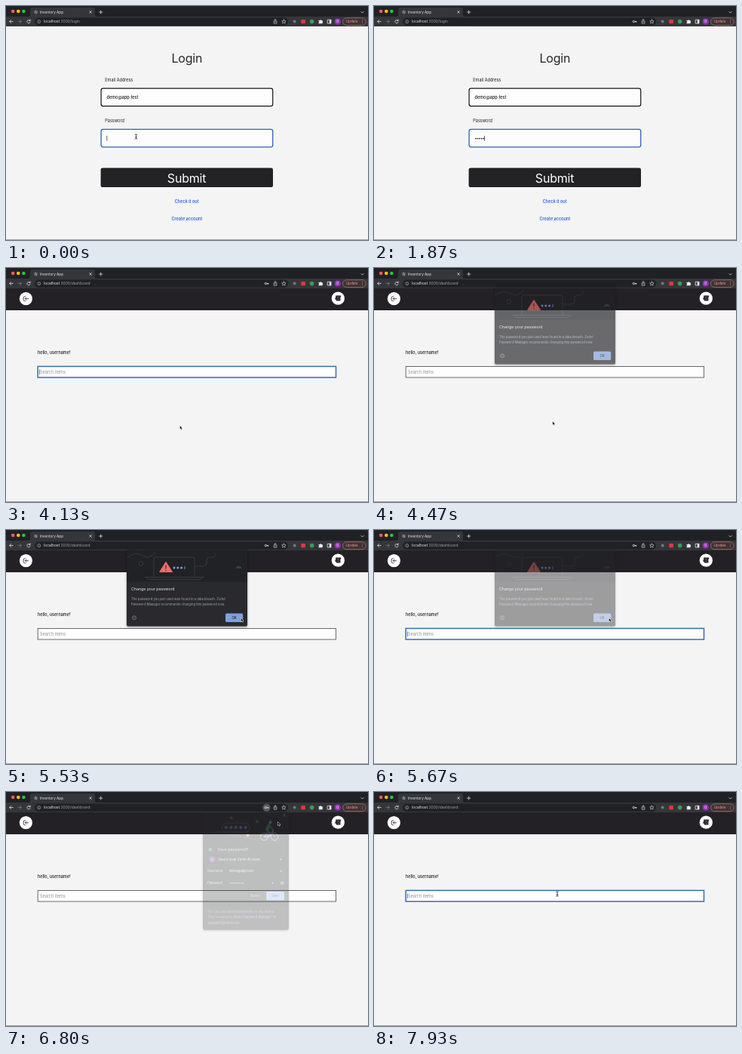
An HTML page for the animation above (8 s loop, 480x310 px).

```html
<!DOCTYPE html>
<html lang="en">
<head>
<meta charset="utf-8">
<title>Inventory App</title>
<style>
  html, body { margin: 0; width: 100%; height: 100%; overflow: hidden; background: #f4f4f4; }
  svg { display: block; width: 100vw; height: 100vh; font-family: Inter, "Open Sans", sans-serif; }
  .page { font-size: 5.5px; fill: #1c1b1f; }
  .ui { font-size: 4.95px; fill: #e8eaed; }
  .small { font-size: 4.22px; fill: #e8eaed; }
  .title { font-size: 5.25px; fill: #e8eaed; }
  .dim { fill: #9aa0a6; }
  .blue { fill: #8ab4f8; }
  .link { fill: #2f66e3; font-weight: 600; }
  .big { font-size: 16px; letter-spacing: -.2px; }
  .mid { text-anchor: middle; }
  .med { font-weight: 500; }
  .line { fill: none; stroke-linecap: round; stroke-linejoin: round; }
  .dots { fill: none; stroke-linecap: round; }
</style>
</head>
<body>
<svg viewBox="0 0 480 310">
  <defs>
    <filter id="shadow" x="-10%" y="-10%" width="120%" height="125%">
      <feDropShadow dx="0" dy="1.2" stdDeviation="1.6" flood-color="#000" flood-opacity=".45"/>
    </filter>
  </defs>
  <rect width="480" height="310" fill="#f4f4f4"/>

  <g id="login" class="page">
    <text class="big mid" x="239.8" y="75" fill="#27262c">Login</text>
    <text x="131.3" y="99.6">Email Address</text>
    <rect x="126.1" y="109.2" width="227.6" height="23.4" rx="2.6" fill="#fdfdfd" stroke="#161519" stroke-width="1.2"/>
    <text class="med" x="133.6" y="123">demo@app.test</text>
    <text x="131.3" y="153.7">Password</text>
    <rect id="pass" x="126.1" y="163.3" width="227.6" height="23.6" rx="2.6" fill="#fdfdfd" stroke-width="1.3"/>
    <path id="typed" class="dots" stroke="#161519" stroke-width="1.7"/>
    <rect id="passCaret" y="171.9" width=".7" height="6.9" fill="#222"/>
    <rect x="125.6" y="214.4" width="228.4" height="25.7" rx="2.6" fill="#232225"/>
    <text class="big mid" x="239.6" y="233.6" fill="#fff">Submit</text>
    <text class="link mid" x="239.7" y="260.7">Check it out</text>
    <text class="link mid" x="239.8" y="283.6">Create account</text>
  </g>

  <g id="dash" class="page">
    <rect y="27" width="480" height="29" fill="#232126"/>
    <circle cx="26.4" cy="40.6" r="8.6" fill="#fff"/>
    <path class="line" d="M25.6 37.8H24.4Q23.2 37.8 23.2 39V42.4Q23.2 43.6 24.4 43.6H25.6M29.6 40.7H25.4M27 39L25.3 40.7L27 42.4" stroke="#232126" stroke-width=".8"/>
    <circle cx="440.3" cy="40.2" r="8.6" fill="#fff"/>
    <path d="M437.2 36.4H444.2V38.6H443.4V43.6H437.8V41.8H436.4V39.4H437.2Z" fill="#232126"/>
    <path d="M438.8 38.6H442M439 41.2H442.2" stroke="#aaa" stroke-width=".5"/>
    <text class="med" x="42" y="113.7">hello, username!</text>
    <rect id="search" x="42.2" y="130.4" width="395.3" height="14.6" fill="#fefefe"/>
    <text x="45" y="139.8" fill="#8b8d94">Search items</text>
    <rect id="searchCaret" x="44.1" y="134.4" width=".6" height="6.8" fill="#333"/>
  </g>

  <rect y="309" width="480" height="1" fill="#a2a2a3"/>

  <g id="chrome">
    <rect width="480" height="27" fill="#202124"/>
    <path d="M0 14H30Q32 14 32 12V5Q32 2 35 2H115Q118 2 118 5V12Q118 14 120 14H480V27H0Z" fill="#35363a"/>
    <circle cx="9.2" cy="7" r="2.3" fill="#fe5f57"/>
    <circle cx="16.3" cy="7" r="2.3" fill="#febc2e"/>
    <circle cx="23.4" cy="7" r="2.3" fill="#28c840"/>
    <circle cx="39.6" cy="8.1" r="2.3" fill="#8d9196"/>
    <path class="line" d="M38 7.2L39.4 8.4L39 9.8M40.2 6.2L41.2 8.2" stroke="#35363a" stroke-width=".7"/>
    <text class="ui" x="45" y="9.9" style="font-size:4.7px">Inventory App</text>
    <g class="line" stroke="#dadce0" stroke-width=".8">
      <path d="M110.8 6.7L113.4 9.3M113.4 6.7L110.8 9.3M123.6 8.1H127.8M125.7 6V10.2M471 7.6L472.6 9.2L474.2 7.6"/>
      <path d="M9.2 20.5H4.8M6.8 18.4L4.7 20.5L6.8 22.6"/>
      <path d="M16 20.5H20.4M18.4 18.4L20.5 20.5L18.4 22.6" stroke="#77797d"/>
      <path d="M31.8 19.2A2.2 2.2 0 1 0 32.2 21.2M32.2 17.9V19.6H30.5"/>
    </g>
    <rect x="38" y="15.4" width="336" height="10.4" rx="5.2" fill="#202124"/>
    <circle cx="43.7" cy="20.6" r="2.1" fill="none" stroke="#b4b7bb" stroke-width=".6"/>
    <path d="M43.7 20.3V21.8M43.7 19.2V19.7" stroke="#b4b7bb" stroke-width=".6"/>
    <text class="ui" x="50" y="22.4">localhost<tspan id="path" class="dim"></tspan></text>
    <g id="key">
      <circle id="halo" cx="345.5" cy="20.6" r="5.2" fill="#56595d"/>
      <circle cx="344.4" cy="20.6" r="1.2" fill="none" stroke="#dadce0" stroke-width=".9"/>
      <path d="M345.6 20.6H348.4M347.5 20.6V21.9" stroke="#dadce0" stroke-width=".9"/>
    </g>
    <g class="line" stroke="#c4c7cb" stroke-width=".7">
      <path d="M355.8 19.8H355.1V23.2H358.9V19.8H358.2M357 21.6V17.8M355.8 18.9L357 17.7L358.2 18.9"/>
      <path d="M368.4 17.9L369.2 19.7L371.1 19.9L369.7 21.2L370.1 23.1L368.4 22.1L366.7 23.1L367.1 21.2L365.7 19.9L367.6 19.7Z"/>
    </g>
    <circle cx="382.6" cy="20.6" r="2" fill="#74777b"/>
    <rect x="391.3" y="17.9" width="5.6" height="5.4" rx="1" fill="#e0383a"/>
    <circle cx="405.6" cy="20.6" r="2.8" fill="#3f9a52"/>
    <path d="M414.6 19H416.2A1 1 0 0 1 418.1 19H419.6V20.4A1 1 0 0 1 419.6 22.2V23.3H414.6V21.9A.9 .9 0 0 0 414.6 20.2Z" fill="#e8eaed"/>
    <path d="M426.2 18.3H431V23H426.2Z" fill="none" stroke="#e8eaed" stroke-width=".8"/>
    <rect x="428.8" y="18.3" width="2.2" height="4.7" fill="#e8eaed"/>
    <circle cx="439.7" cy="20.6" r="4" fill="#9a2fc4"/>
    <text class="mid" x="439.7" y="22.2" font-size="4.4" fill="#fff">O</text>
    <rect x="446.6" y="15.8" width="30.6" height="9.8" rx="4.9" fill="#3c3336" stroke="#c9766f" stroke-width=".7"/>
    <text x="450.4" y="22.3" font-size="4.8" fill="#f0958c">Update</text>
    <path class="dots" d="M472.6 18.7h0M472.6 20.6h0M472.6 22.5h0" stroke="#f0958c" stroke-width=".9"/>
  </g>

  <g id="breach">
    <path d="M160 26.6H320V125.5Q320 127.6 318 127.6H162Q160 127.6 160 125.5Z" fill="#292a2d" filter="url(#shadow)"/>
    <rect x="160" y="26.6" width="160" height="42" fill="#212225"/>
    <g class="line" stroke="#3e4044" stroke-width=".8">
      <path d="M196 62V38Q196 36 198 36H248Q250 36 250 38V62M184 62.5H262M186 62.5Q187 65.5 190 65.5H256Q260 65.5 261 62.5"/>
      <path d="M161 36Q172 28 181 34T198 30M250 48H262Q266 48 266 44V40Q266 36 270 36H274Q278 36 277 31"/>
      <circle cx="179" cy="44.5" r="2.8"/>
      <path d="M305 50.5H312Q312 48 309.6 48.4Q307.6 46.4 306.6 49Q305 49 305 50.5Z" fill="#3e4044"/>
    </g>
    <path d="M212 42.4L220.6 55.6H203.6Z" fill="#ef6d68" stroke="#ef6d68" stroke-linejoin="round"/>
    <path d="M212 46.6V51.4M212 53V54.2" stroke="#292a2d" stroke-width="1.1"/>
    <path class="dots" d="M223 50h0M227.8 50h0M232.6 50h0" stroke="#7f9fe6" stroke-width="3"/>
    <path d="M237 48V52" stroke="#7f9fe6" stroke-width=".9"/>
    <text class="title" x="166" y="79.7">Change your password</text>
    <text class="small dim" x="166" y="93">The password you just used was found in a data breach. Zorlet</text>
    <text class="small dim" x="166" y="100">Password Manager recommends changing this password now.</text>
    <circle cx="170" cy="116.2" r="2.5" fill="none" stroke="#9aa0a6" stroke-width=".6"/>
    <text class="mid" x="170" y="117.6" font-size="3.8" fill="#9aa0a6">?</text>
    <rect x="291" y="110.5" width="23.2" height="11.6" rx="1.6" fill="#7f9fdf"/>
    <text class="mid med" x="302.6" y="117.9" font-size="4.4" fill="#202124">OK</text>
  </g>

  <g id="save">
    <path d="M261 26.6H375V180Q375 182.4 372.6 182.4H263.4Q261 182.4 261 180Z" fill="#28292c" filter="url(#shadow)"/>
    <path d="M261 149.5H375V180Q375 182.4 372.6 182.4H263.4Q261 182.4 261 180Z" fill="#323336"/>
    <path class="line" d="M367.5 29.5L370.5 32.5M370.5 29.5L367.5 32.5" stroke="#bdc1c6" stroke-width=".7"/>
    <path class="line" d="M275 54Q282 50 290 54T308 58Q320 62 334 64H364" stroke="#5f6368" stroke-width=".6"/>
    <rect x="286.5" y="41.2" width="37" height="11.8" rx="5.9" fill="#28292c" stroke="#6d7176" stroke-width=".7"/>
    <path id="pill" class="dots" stroke="#6f9cf0" stroke-width="4"/>
    <path d="M298.6 31.8L301 36.2L296.6 35Z" fill="#ee5a50"/>
    <rect x="331.2" y="37.2" width="3.4" height="3.4" rx=".5" fill="#45a85c"/>
    <circle cx="320.6" cy="57.4" r="1.9" fill="#f4b83a"/>
    <g class="line">
      <g stroke="#dfe2e6" stroke-width=".8">
        <circle cx="342.4" cy="59.2" r="4.8"/><circle cx="356" cy="59.2" r="4.8"/>
        <path d="M342.4 59.2L345.6 54.4H353L349 59.6H342.4M356 59.2L352.6 51.6H355"/>
      </g>
      <path d="M346 51L350 54L348.8 59.4" stroke="#5f8ff0" stroke-width="2"/>
      <path d="M346.2 50L348.6 44.4" stroke="#36a457" stroke-width="4.6"/>
      <path d="M350 45.4L354.4 50.6" stroke="#36a457" stroke-width="1.5"/>
      <circle cx="350.4" cy="40.6" r="1.8" fill="#e3a98c"/>
      <path d="M348.6 40Q350 37.6 352.4 39.4" stroke="#5f8ff0" stroke-width="1.2"/>
    </g>
    <circle cx="271" cy="76.2" r="2.4" fill="#3f9a6a"/>
    <text class="title" x="280.8" y="78.2">Save password?</text>
    <circle cx="273.4" cy="89.2" r="3.8" fill="#9a2fc4"/>
    <text class="mid" x="273.4" y="90.7" font-size="4" fill="#fff">O</text>
    <text class="small med" x="281.2" y="90.7">Save in your Zorlet Account</text>
    <path d="M363 88.5H366.4L364.7 90.4ZM363 104.2H366.4L364.7 106.1ZM351.8 119.8H355.2L353.5 121.7Z" fill="#c4c7cb"/>
    <text class="small" x="267" y="106.2">Username</text>
    <text class="small med" x="296" y="106.2">demo@app.test</text>
    <text class="small" x="267" y="122">Password</text>
    <path id="masked" class="dots" stroke="#e8eaed" stroke-width="1.5"/>
    <path d="M363.4 120.6Q366.2 117 369 120.6Q366.2 124 363.4 120.6Z" fill="none" stroke="#c4c7cb" stroke-width=".7"/>
    <circle cx="366.2" cy="120.5" r=".9" fill="#c4c7cb"/>
    <text class="small blue med mid" x="330.3" y="139.3">Never</text>
    <rect x="345.2" y="132" width="23.8" height="11.5" rx="1.6" fill="#8aaef2"/>
    <text class="small med mid" x="357.1" y="139.3" style="fill:#202124">Save</text>
    <text class="small dim" x="267" y="160.2">You can use saved passwords on any device.</text>
    <text class="small dim" x="267" y="167.4">They’re saved to <tspan class="blue">Zorlet Password Manager</tspan> for</text>
    <text class="small dim" x="267" y="174.6">sample07@inbox.test.</text>
  </g>

  <g id="mouse">
    <path id="beam" class="line" d="M-1.4 -3.1Q0 -3.1 0 -2.2Q0 -3.1 1.4 -3.1M0 -2.2V2.2M-1.4 3.1Q0 3.1 0 2.2Q0 3.1 1.4 3.1M-.7 .7H.7" stroke="#222" stroke-width=".75"/>
    <path id="arrow" d="M0 0V5L1.2 4L2 5.7L2.9 5.3L2.2 3.7H3.6Z" fill="#000" stroke="#fff" stroke-width=".5"/>
    <path id="hand" d="M-1 -2.8Q-.3 -3.4 .2 -2.6V-.8L2 -.4Q2.6 0 2.4 1L1.8 2.8H-.6L-2.2 .6Q-2 -.2 -1 .4Z" fill="#fff" stroke="#111" stroke-width=".5"/>
  </g>
</svg>
<script>
const LOOP = 8000, STEP = 200 / 3, BLINK = 536;
const SUBMIT = 3730, LOADED = 4000, WARNED = 4400, ACCEPTED = 5590, DISMISSED = 6660, REFOCUS = 6850;
const KEYS = [1130, 1270, 1470, 1670, 1870, 1930, 2000, 2063];
const MOVES = [
  [0, 172.5, 173], [3070, 172.5, 173], [3670, 208.2, 229], [3970, 208.2, 229],
  [4200, 236.8, 203], [4470, 236.8, 203], [5200, 311.5, 116.5], [5730, 311.5, 116.5],
  [6000, 364.6, 63.4], [6400, 368.6, 32.4], [6670, 368.6, 32.4],
  [7470, 252, 131.6], [7930, 243, 135]
];

const el = {};
document.querySelectorAll('svg [id]').forEach(n => el[n.id] = n);

const set = (name, attrs) => {
  for (const a in attrs) el[name].setAttribute(a, attrs[a]);
};
const show = (name, on) => { el[name].style.display = on ? '' : 'none'; };
const clamp = v => Math.min(1, Math.max(0, v));
const ramp = (t, a, b) => clamp((t - a) / (b - a));
const blink = (t, since) => (t - since) % (2 * BLINK) < BLINK;
const dots = (x, y, gap, n) =>
  Array.from({ length: n }, (_, i) => `M${x + gap * i} ${y}h0`).join('');

function pointer(t) {
  const i = MOVES.findIndex(m => m[0] > t);
  if (i < 0) return MOVES[MOVES.length - 1].slice(1);
  const [t0, x0, y0] = MOVES[i - 1], [t1, x1, y1] = MOVES[i];
  const p = ramp(t, t0, t1), e = p * p * (3 - 2 * p);
  return [x0 + (x1 - x0) * e, y0 + (y1 - y0) * e];
}

function fade(name, v) {
  show(name, v > 0);
  el[name].style.opacity = v;
}

function drawLogin(t) {
  const n = KEYS.filter(k => k <= t).length;
  const focused = t < SUBMIT;
  set('pass', { stroke: focused ? '#3562ad' : '#161519' });
  set('typed', { d: dots(135, 175.6, 2.55, n) });
  set('passCaret', { x: 133.5 + 2.55 * n });
  show('passCaret', focused && blink(t, n ? KEYS[n - 1] : -210));
}

function drawDash(t) {
  const since = t < WARNED ? LOADED : t < DISMISSED ? ACCEPTED : REFOCUS;
  const focused = t >= since;
  set('search', { stroke: focused ? '#3a6bb3' : '#444448', 'stroke-width': focused ? 1.5 : .8 });
  show('searchCaret', focused && blink(t, since));
}

function drawMouse(t, home) {
  const [x, y] = pointer(t);
  const onField = home
    ? x > 42 && x < 438 && y > 130 && y < 145 && t > REFOCUS
    : y < 187;
  const onButton = !home && y > 214;
  show('mouse', t < KEYS[0] || t >= 3070);
  show('beam', onField);
  show('hand', onButton);
  show('arrow', !onField && !onButton);
  set('mouse', { transform: `translate(${x} ${y})` });
}

function draw(ms) {
  const t = Math.round(Math.floor((ms + 4) / STEP) * STEP / 10) * 10 % LOOP;
  const home = t >= LOADED;
  show('login', !home);
  show('dash', home);
  el.path.textContent = ':3000/' + (home ? 'dashboard' : 'login');
  if (home) drawDash(t); else drawLogin(t);
  const saving = ramp(t, 5730, 5930) - ramp(t, DISMISSED, REFOCUS);
  fade('breach', ramp(t, 4333, 4535) - ramp(t, ACCEPTED, 5730));
  fade('save', saving);
  show('key', t >= KEYS[0]);
  show('halo', saving > 0);
  drawMouse(t, home);
}

set('pill', { d: dots(292, 47.1, 6.4, 5) });
set('masked', { d: dots(297, 120.7, 2.55, 8) });

const start = performance.now();
function frame() {
  draw((performance.now() - start) % LOOP);
  requestAnimationFrame(frame);
}
frame();
</script>
</body>
</html>
```
